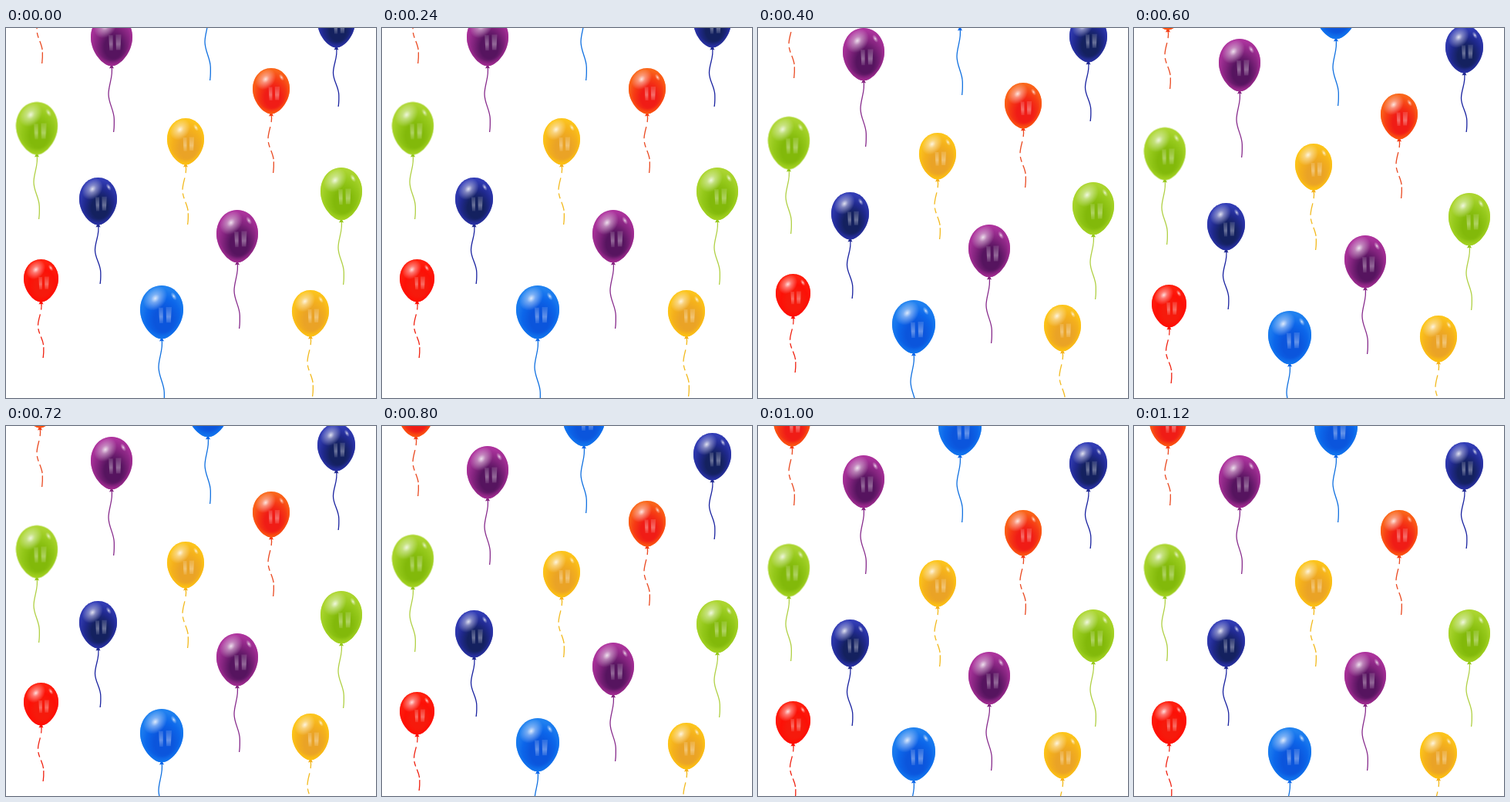
These frames come from a looping animation (480x480 px, 1200 ms). An HTML page:

```html
<!DOCTYPE html>
<html lang="en">
<head>
<meta charset="utf-8">
<title>Balloons</title>
<style>
  html, body { margin: 0; width: 100%; height: 100%; overflow: hidden; background: #fff; }
  svg { display: block; width: 480px; height: 480px; }
  #sky { animation: drift 1200ms step-end infinite; }
  /* uneven, hard steps */
  @keyframes drift {
    0% { transform: translateY(0); }
    33.333% { transform: translateY(19px); }
    50% { transform: translateY(33px); }
    66.667% { transform: translateY(45px); }
    83.333%, 100% { transform: translateY(57px); }
  }
</style>
</head>
<body>
<svg viewBox="0 0 480 480">
  <defs id="defs">
    <radialGradient id="shine">
      <stop offset="0" stop-color="#fff" stop-opacity=".85"/>
      <stop offset=".35" stop-color="#fff" stop-opacity=".42"/>
      <stop offset="1" stop-color="#fff" stop-opacity="0"/>
    </radialGradient>
    <linearGradient id="pane" x1="0" y1="0" x2="0" y2="1">
      <stop offset="0" stop-color="#fff" stop-opacity=".12"/>
      <stop offset=".6" stop-color="#fff" stop-opacity=".36"/>
      <stop offset="1" stop-color="#fff" stop-opacity=".1"/>
    </linearGradient>
    <!-- lights in a 100 x 100 box -->
    <g id="lights">
      <ellipse cx="35" cy="24" rx="29" ry="21" fill="url(#shine)" transform="rotate(-25 35 24)"/>
      <ellipse cx="78" cy="20" rx="9" ry="5" fill="url(#shine)" transform="rotate(48 78 20)"/>
      <path d="M43 41h10v29h-8zM60 40h13l-2 29h-10z" fill="url(#pane)"/>
    </g>
  </defs>
  <g id="sky"></g>
</svg>
<script>
  // w, h: body size; tail: string length; core, mid, top, rim: shades
  const kinds = {
    purple: { w: 54, h: 69, tail: 85, core: '#56145f', mid: '#84247f', top: '#b93aa8', rim: '#a52b93', line: '#872b8c' },
    blue: { w: 56, h: 70, tail: 86, core: '#0b55dc', mid: '#0c66ea', top: '#2a8cf2', rim: '#1277ee', line: '#1070e0' },
    navy: { w: 49, h: 62, tail: 76, core: '#14215f', mid: '#20298e', top: '#3945c4', rim: '#2a32a8', line: '#1a23a0' },
    green: { w: 54, h: 69, tail: 83, core: '#82b90a', mid: '#94c81a', top: '#b4da3c', rim: '#a5d322', line: '#b0d044' },
    yellow: { w: 48, h: 61, tail: 77, core: '#eaa326', mid: '#f4b01c', top: '#fdc921', rim: '#ffc40f', line: '#f2b91c', broken: true },
    orange: { w: 48, h: 60, tail: 76, core: '#f01c16', mid: '#f63a14', top: '#fa7420', rim: '#fc5a10', line: '#ea4a22', broken: true },
    red: { w: 45, h: 56, tail: 72, core: '#f61a0c', mid: '#fd1006', top: '#ff2a14', rim: '#ff0d02', line: '#f0200f', broken: true }
  };

  // kind, centre x, top y
  const balloons = [
    ['orange', 44, -90], ['purple', 137, -19], ['blue', 262, -88],
    ['navy', 428.5, -36], ['orange', 344, 52], ['green', 40, 96],
    ['yellow', 233, 117], ['green', 435, 181], ['navy', 119.5, 194],
    ['purple', 300, 236], ['red', 45.5, 300], ['blue', 202, 334],
    ['yellow', 395, 340]
  ];

  const egg = 'M50 0C79 0 100 20 100 45C100 72 72 99 50 99C28 99 0 72 0 45C0 20 21 0 50 0Z';

  function gradients(name, k) {
    return `<radialGradient id="${name}" cx=".54" cy=".64" r=".66">
      <stop offset="0" stop-color="${k.core}"/>
      <stop offset=".32" stop-color="${k.core}"/>
      <stop offset=".6" stop-color="${k.mid}"/>
      <stop offset="1" stop-color="${k.top}"/>
    </radialGradient>
    <radialGradient id="${name}-rim" cx=".5" cy=".47" r=".53">
      <stop offset=".78" stop-color="${k.rim}" stop-opacity="0"/>
      <stop offset="1" stop-color="${k.rim}"/>
    </radialGradient>`;
  }

  function string(k) {
    const y = f => (k.tail * f).toFixed(1);
    const d = `M0 0C2.5 ${y(.14)} -4 ${y(.28)} -4 ${y(.42)}S3 ${y(.66)} 3.3 ${y(.8)}S3 ${y(.95)} 2.6 ${y(1)}`;
    const dash = k.broken ? ' stroke-dasharray="13 8 20 6 9 6 15 4 19"' : '';
    return `<path d="${d}" pathLength="100" fill="none" stroke="${k.line}" stroke-width="1.3"${dash}/>`;
  }

  function balloon([name, x, y]) {
    const k = kinds[name];
    return `<g transform="translate(${x} ${y})">
      <g transform="translate(0 ${k.h})">
        ${string(k)}
        <path d="M-1 -1.5h2l2 4l-3 -.7l-3 .7z" fill="${k.mid}"/>
      </g>
      <g transform="translate(${-k.w / 2} 0) scale(${k.w / 100} ${k.h / 100})">
        <path d="${egg}" fill="url(#${name})"/>
        <path d="${egg}" fill="url(#${name}-rim)"/>
        <use href="#lights"/>
      </g>
    </g>`;
  }

  document.getElementById('defs').innerHTML +=
    Object.entries(kinds).map(([name, k]) => gradients(name, k)).join('');
  document.getElementById('sky').innerHTML = balloons.map(balloon).join('');
</script>
</body>
</html>
```
